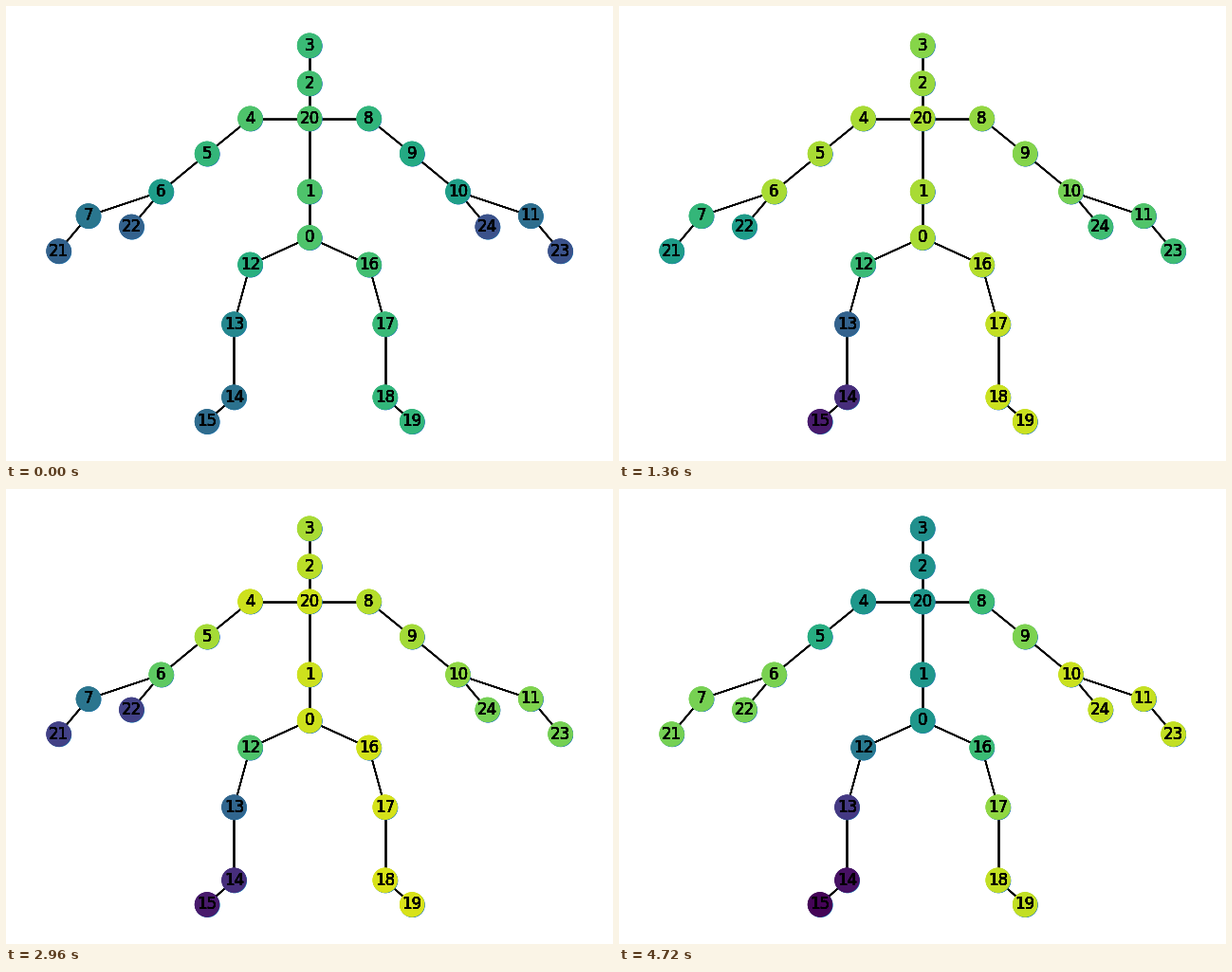
Recreate the animation shown at these times as a matplotlib script. Size 640x480 px, loop 4800 ms.

```python
import numpy as np
import matplotlib.pyplot as plt
from matplotlib.animation import FuncAnimation
from matplotlib.collections import LineCollection

W, H, DPI = 640, 480, 100
FRAMES, STEP_MS = 60, 80
STACK = 8  # repeated drawing hardens the soft edges of lines and labels

# Skeleton on a whole-number grid: heights of the spine joints, then
# (distance from the spine, height) of each mirrored pair of joints.
SPINE = {3: 0, 2: 14, 20: 27, 1: 54, 0: 71}
PAIRS = {
    (4, 8): (22, 27), (5, 9): (38, 40), (6, 10): (55, 54),
    (7, 11): (82, 63), (22, 24): (66, 67), (21, 23): (93, 76),
    (12, 16): (22, 81), (13, 17): (28, 103),
    (14, 18): (28, 130), (15, 19): (38, 139),
}
CHAINS = [
    (3, 2, 20, 1, 0),
    (20, 4, 5, 6, 7, 21), (6, 22),
    (20, 8, 9, 10, 11, 23), (10, 24),
    (0, 12, 13, 14, 15),
    (0, 16, 17, 18, 19),
]

# Activation of the body's anchor parts at a few key steps.
KEYS = [0, 9, 17, 30, 44, 52, 59]
ANCHORS = {
    "core": [.72, .945, .87, .92, .93, .775, .53],
    "left wrist": [.55, .84, .87, .70, .80, .79, .80],
    "left hand": [.31, .45, .55, .02, .37, .62, .79],
    "right wrist": [.56, .83, .79, .77, .90, .94, .92],
    "right hand": [.25, .59, .69, .70, .88, .93, .91],
    "left foot": [.35, .24, .07, .04, .10, .02, .01],
    "right foot": [.66, .945, .92, .94, .94, .94, .91],
}

# Joints between two anchors, with how far each leans to the second one.
LIMBS = [
    ("core", "left wrist", {20: 0, 1: 0, 0: 0, 4: 0, 5: .35, 6: 1}),
    ("left wrist", "left hand", {7: .65, 21: 1, 22: 1}),
    ("core", "right wrist", {8: .4, 9: .7, 10: 1}),
    ("right wrist", "right hand", {11: .65, 23: 1, 24: 1}),
    ("core", "left foot", {12: .24, 13: .7, 14: .93, 15: 1}),
    ("core", "right foot", {16: .4, 17: .8, 18: 1, 19: 1}),
]
HEAD_FADE = {2: .97, 3: .94}


def joint_positions():
    grid = {joint: (0, y) for joint, y in SPINE.items()}
    for (left, right), (x, y) in PAIRS.items():
        grid[left] = (-x, y)
        grid[right] = (x, y)
    xy = np.array([grid[j] for j in range(len(grid))], float)
    # Fit the stage with a 5% margin applied twice on every side.
    span = np.array([W, H]) / 1.1 ** 2
    top_left = (np.array([W, H]) - span) / 2
    low, high = xy.min(axis=0), xy.max(axis=0)
    return top_left + (xy - low) / (high - low) * span


def joint_levels(count):
    steps = np.arange(FRAMES)
    track = {name: np.interp(steps, KEYS, v) for name, v in ANCHORS.items()}
    levels = np.zeros((FRAMES, count))
    for start, end, weights in LIMBS:
        for joint, w in weights.items():
            levels[:, joint] = (1 - w) * track[start] + w * track[end]
    for joint, fade in HEAD_FADE.items():
        levels[:, joint] = fade * track["core"]
    return levels


def add_discs(xy, colors, layers, zorder):
    x, y = np.tile(xy, (layers, 1)).T
    discs = ax.scatter(x, y, s=300, linewidths=1.5, zorder=zorder)
    discs.set_color(colors)
    return discs


points = joint_positions()
levels = joint_levels(len(points))

fig = plt.figure(figsize=(W / DPI, H / DPI), dpi=DPI, facecolor="white")
ax = fig.add_axes([0, 0, 1, 1])
ax.axis("off")

bones = [points[[a, b]] for chain in CHAINS for a, b in zip(chain, chain[1:])]
ax.add_collection(LineCollection(bones * STACK, colors="black",
                                 linewidths=1, zorder=1))

# A slightly shifted disc leaves a thin rim on the lower right.
add_discs(points + 0.5, ["#1f78b4"] * len(points), 2, zorder=2)
nodes = add_discs(points, plt.cm.viridis(levels[0]), 3, zorder=3)

for joint, (x, y) in enumerate(points):
    for _ in range(STACK):
        ax.text(x, y, str(joint), ha="center", va="center", fontsize=12,
                family="DejaVu Sans", color="black", zorder=4)

ax.set_xlim(0, W)
ax.set_ylim(H, 0)


def draw(frame):
    nodes.set_color(plt.cm.viridis(levels[frame]))
    return [nodes]


anim = FuncAnimation(fig, draw, frames=FRAMES, interval=STEP_MS,
                     repeat=True, repeat_delay=0)
plt.show()
```
